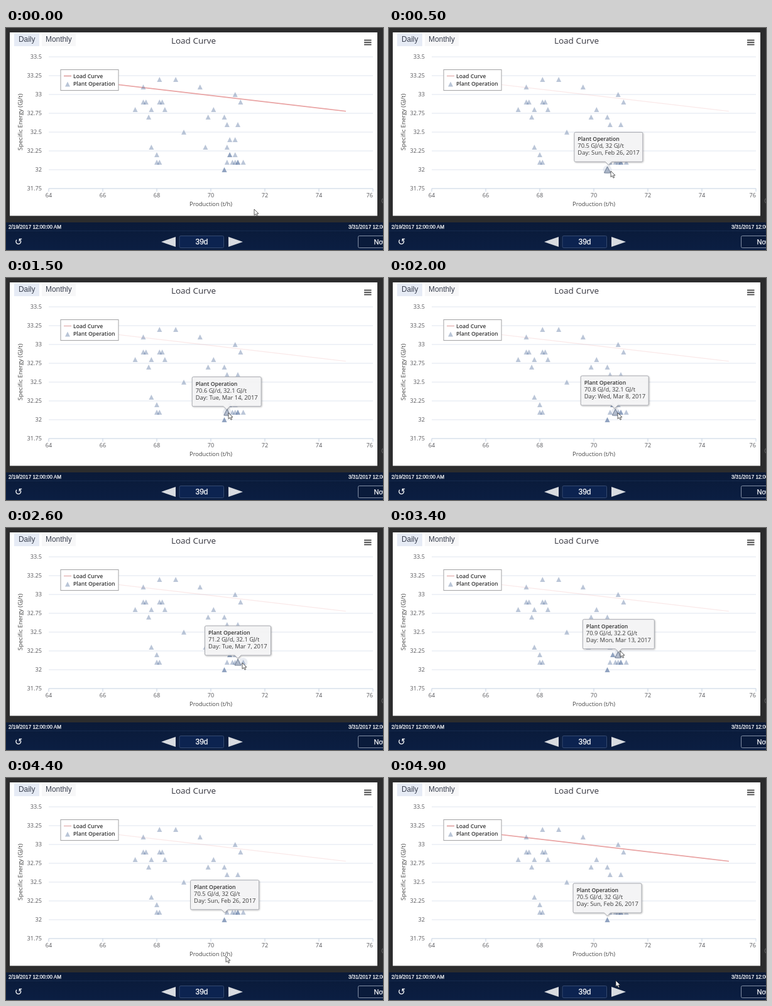
Write an HTML page that moves like this. It is 600 px wide and 354 px high and loops after 5 s.

```html
<!DOCTYPE html>
<html>
<head>
<meta charset="utf-8">
<style>
html, body { margin: 0; width: 100%; height: 100%; overflow: hidden; background: #2c2c2d; }
svg { display: block; font-family: "Open Sans", "Noto Sans", sans-serif; fill: #444; }
.ui { font-family: "Liberation Sans", Arial, sans-serif; }
.axis { font-size: 9.2px; fill: #5a5a5e; }
.name { font-size: 8.7px; font-weight: 600; fill: #333; }
.row { font-size: 9.4px; fill: #3a3a3a; }
.bright { fill: #fff; stroke: #fff; stroke-width: .25px; }
</style>
</head>
<body>
<svg width="600" height="354" viewBox="0 0 600 354">
  <defs>
    <linearGradient id="navy" x2="0" y2="1">
      <stop stop-color="#0a1a38"/><stop offset="1" stop-color="#0b1e42"/>
    </linearGradient>
    <filter id="shadow" x="-10%" y="-10%" width="120%" height="130%">
      <feDropShadow dx="1" dy="1" stdDeviation="1" flood-opacity=".25"/>
    </filter>
  </defs>

  <rect width="600" height="354" fill="#2c2c2d"/>
  <rect x="6" y="7" width="585" height="292.5" fill="#fff"/>
  <circle cx="602" cy="275.5" r="4" fill="none" stroke="#666"/>

  <g class="ui" font-size="11.9" fill="#3c4252">
    <rect x="13" y="8" width="40" height="21" fill="#e6ebf5"/>
    <rect x="57" y="8" width="54" height="21" fill="#f7f7f8"/>
    <text x="20" y="22.4">Daily</text>
    <text x="63" y="22.4">Monthly</text>
  </g>
  <text x="298.5" y="25" font-size="13.5" text-anchor="middle" fill="#33333d">Load Curve</text>
  <path d="M570 19.5h11.5M570 23h11.5M570 26.5h11.5" stroke="#555" stroke-width="1.8"/>

  <g id="grid"></g>
  <text x="326" y="284" font-size="9.3" text-anchor="middle">Production (t/h)</text>
  <text transform="translate(25.5 150) rotate(-90)" font-size="9.5" text-anchor="middle">Specific Energy (GJ/t)</text>

  <path id="curve" d="M90 80Q326 108.5 541 132.7" fill="none" stroke="#e9a3a3"/>
  <g id="points" fill="#4f6d9a" fill-opacity=".39"></g>

  <rect x="87" y="66.5" width="92" height="33" fill="#fff" stroke="#a2a2a4"/>
  <path id="key" d="M92 76.5h12" stroke="#dd9b9b"/>
  <path d="M98 85.5l4 8h-8z" fill="#b9c5d7"/>
  <text class="name" x="107" y="79.5">Load Curve</text>
  <text class="name" x="107" y="92.3">Plant Operation</text>

  <rect y="310" width="600" height="44" fill="url(#navy)"/>
  <path d="M0 323.5h600" stroke="#152a4e"/>
  <g class="ui" font-size="8.15">
    <text class="bright" x="4" y="320">2/19/2017 12:00:00 AM</text>
    <text class="bright" x="545" y="320">3/31/2017 12:00:00 AM</text>
    <path d="M247 341l23-8v16zM377 341l-23-8v16z" fill="#d8dbe0"/>
    <rect x="276" y="331.5" width="70.5" height="19" rx="2" fill="#0c2350" stroke="#34496f"/>
    <rect x="560.5" y="331.5" width="70" height="19" rx="2" fill="#0a1b3b" stroke="#8490a6"/>
    <text class="bright" x="311.5" y="345" font-size="11.9" text-anchor="middle">39d</text>
    <text class="bright" x="585.5" y="345" font-size="11">Now</text>
    <text x="20" y="346" font-family="DejaVu Sans, sans-serif" font-size="15" text-anchor="middle" fill="#fff">↺</text>
  </g>

  <g id="marks"></g>
  <g id="tip">
    <path id="box" fill="#f5f5f6" fill-opacity=".95" stroke="#a6a8ae" filter="url(#shadow)"/>
    <text class="name" x="5.5" y="14">Plant Operation</text>
    <text class="row" x="5.5" y="25" id="values"></text>
    <text class="row" x="5.5" y="36" id="day"></text>
  </g>
  <path id="cursor" d="M0 0V9.6L2.2 7.6 4 11.2 5.6 10.4 3.9 7H7Z" fill="#fff" stroke="#333" stroke-width=".8"/>
</svg>

<script>
const $ = id => document.getElementById(id);
const px = v => 68 + (v - 64) * 43;
const py = v => 226 - (v - 32) * 120;
const mix = (a, b, k) => a.map((v, i) => v + (b[i] - v) * k);
const triangle = (x, y, r) => `<path d="M${px(x)} ${py(y) - r}l${r} ${2 * r}h${-2 * r}z"/>`;

let grid = '';
for (let v = 31.75; v <= 33.5; v += 0.25) {
  const y = py(v);
  grid += `<path d="M68 ${y}H584" stroke="${v > 31.75 ? '#dfe5ef' : '#c3d0e0'}"/>
    <text class="axis" x="57" y="${y + 3}" text-anchor="end">${v}</text>`;
}
for (let v = 64; v <= 76; v += 2) {
  grid += `<path d="M${px(v)} 256v5" stroke="#c3d0e0"/>
    <text class="axis" x="${px(v)}" y="270" text-anchor="${v < 76 ? 'middle' : 'end'}">${v}</text>`;
}
$('grid').innerHTML = grid;

// production values for each 0.1 GJ/t, from 32 upward
const plant = [
  [70.5, 70.5], [68, 68.1, 70.6, 70.8, 70.9, 71, 71, 71.2], [68, 70.7, 70.7, 70.9],
  [67.8, 69.8, 70.6], [70.7, 70.9], [69], [70.6, 71], [67.7, 69.9, 70.5],
  [67.2, 67.8, 68.3, 70.1], [67.5, 67.6, 68.1, 68.2, 71.1], [70.9], [67.5, 69.6], [68.1, 68.7]
];
$('points').innerHTML =
  plant.flatMap((xs, i) => xs.map(x => triangle(x, 32 + i / 10, 4))).join('');

const hovers = [
  { at: 100, x: 70.8, y: 32.1, day: 17 },
  { at: 200, x: 70.5, y: 32, day: 7 },
  { at: 1200, x: 70.6, y: 32.1, day: 23 },
  { at: 1700, x: 70.8, y: 32.1, day: 17 },
  { at: 2200, x: 71, y: 32.1, day: 18 },
  { at: 2600, x: 71.2, y: 32.1, day: 16 },
  { at: 2700, x: 71, y: 32.1, day: 18 },
  { at: 3100, x: 70.9, y: 32.2, day: 22 },
  { at: 3700, x: 70.6, y: 32.3, day: 21 },
  { at: 4100, x: 70.5, y: 32, day: 7 }
];
const cursorPath = [
  [0, 395, 289], [500, 353, 228], [1500, 354, 215], [2600, 376, 215], [3400, 368, 196],
  [3900, 351, 196], [4200, 349, 226], [4400, 350, 284], [4700, 354, 328], [4900, 361, 323]
];
const leave = 4400, slide = 350, markLag = 250;
const pauses = [14, 21, 22, 40, 41, 43, 45]; // tenths of a second without movement

function dateText(day) {
  return new Date(2017, 1, 19 + day).toLocaleDateString('en-US',
    { weekday: 'short', month: 'short', day: 'numeric', year: 'numeric' });
}

// the tooltip slides to each point from wherever it was
function tipAt(i, t) {
  const { at, x, y } = hovers[i];
  const goal = [px(x), py(y) - 58];
  return i ? mix(tipAt(i - 1, at), goal, Math.min(1, (t - at) / slide)) : goal;
}

function cursorAt(t) {
  const i = Math.max(1, cursorPath.findIndex(p => p[0] >= t));
  const [a, b] = [cursorPath[i - 1], cursorPath[i]];
  return mix(a, b, (t - a[0]) / (b[0] - a[0])).slice(1);
}

function draw(t) {
  const i = hovers.findLastIndex(h => h.at <= t);
  const dim = i >= 0 && t < leave + 200;
  $('curve').setAttribute('stroke-opacity', dim ? .25 : 1);
  $('curve').setAttribute('stroke-width', dim ? 1.1 : 1.6);
  $('key').setAttribute('stroke-width', dim ? 1 : 1.6);
  $('cursor').setAttribute('transform', `translate(${cursorAt(t)})`);

  $('tip').style.display = i < 0 ? 'none' : '';
  $('marks').innerHTML = '';
  if (i < 0) return;

  const { x, y, day } = hovers[i];
  const big = hovers.findLast(h => h.at + markLag <= t);
  if (t < leave) {
    $('marks').innerHTML =
      `<circle cx="${px(x)}" cy="${py(y)}" r="7" fill="#4f6d9a" fill-opacity=".12"/>` +
      (big ? `<g fill="#b3bccb" fill-opacity=".8" stroke="#6c7b92">${triangle(big.x, big.y, 5)}</g>` : '');
  }
  $('values').textContent = `${x} GJ/d, ${y} GJ/t`;
  $('day').textContent = `Day: ${dateText(day)}`;
  const w = Math.round($('day').getComputedTextLength() + 11);
  const [cx, top] = tipAt(i, t);
  $('tip').setAttribute('transform', `translate(${cx - w / 2} ${top})`);
  $('box').setAttribute('d',
    `M2 0H${w - 2}q2 0 2 2V45q0 2-2 2H${w / 2 + 5}l-5 5-5-5H2q-2 0-2-2V2q0-2 2-2z`);
}

function tick(now) {
  let step = Math.floor(now % 5000 / 100);
  while (pauses.includes(step)) step--;
  draw(step * 100);
  requestAnimationFrame(tick);
}
draw(0);
requestAnimationFrame(tick);
</script>
</body>
</html>
```
